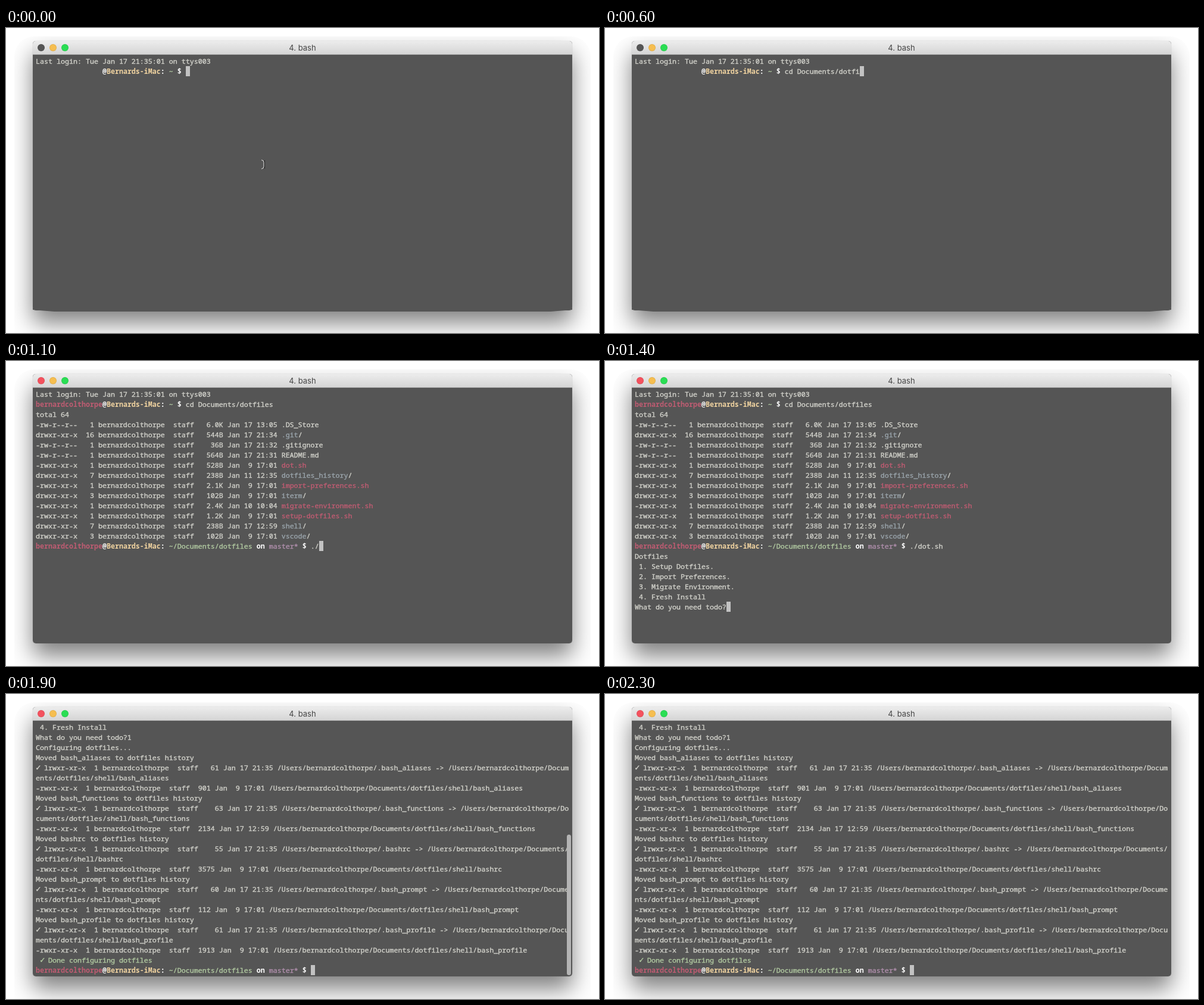
These frames come from a looping animation (996x512 px, 4300 ms). An HTML page:

```html
<!DOCTYPE html>
<html lang="en">
<head>
<meta charset="utf-8">
<title>Terminal</title>
<style>
html, body { margin: 0; width: 100%; height: 100%; overflow: hidden; background: #fff; }
#stage { position: relative; width: 100%; height: 100%; overflow: hidden; contain: paint; }
#stage > * { position: absolute; }
#halo { left: 14px; top: 14px; right: 14px; bottom: 0; border-radius: 34px 34px 0 0; overflow: hidden; }
#halo div { position: absolute; left: 31px; top: 8px; width: 906px; height: 452px; border-radius: 5px;
  box-shadow: 0 21px 38px rgba(0, 0, 0, .5), 0 0 1px rgba(0, 0, 0, .4); }
#lip { left: 45px; top: 470px; width: 906px; height: 6px; background: #555;
  clip-path: polygon(0 0, 100% 0, 100% 50%, 96% 100%, 4% 100%, 0 50%); }
#win { left: 45px; top: 22px; width: 906px; height: 452px; border-radius: 5px; overflow: hidden; background: #555; }
#bar { height: 23px; border-bottom: 1px solid #aaa; box-sizing: border-box; text-align: center;
  background: linear-gradient(#ececec, #d5d5d5); color: #454545; font: 13px/23px Inter, sans-serif; }
#bar i { position: absolute; top: 5px; width: 12px; height: 12px; border-radius: 50%;
  box-shadow: inset 0 0 0 1px rgba(0, 0, 0, .08); }
#text { position: absolute; left: 5px; top: 25px; color: #d0d0c9; white-space: pre;
  font: 11.667px/17px "Noto Sans Mono", "DejaVu Sans Mono", monospace; font-variant-ligatures: none;
  -webkit-text-stroke: .4px; }
#text div { height: 17px; }
#text .check { display: inline-block; width: 7px; height: 17px; vertical-align: top;
  font-family: "DejaVu Sans Mono", monospace; font-size: 14px; }
#text .cursor { display: inline-block; width: 7px; height: 17px; vertical-align: top; background: #c2c2c2; }
#scroll { position: absolute; left: 897px; top: 214px; width: 7px; height: 236px; border-radius: 4px; background: #b4b4b4; }
b { color: #fff; -webkit-text-stroke: 0; }
.red { color: #bf5c72; }
.yellow { color: #f0d3a0; }
.green { color: #b0c8a0; }
.purple { color: #b08fac; }
.blue { color: #99a3aa; }
.early .user { visibility: hidden; }
</style>
</head>
<body>
<div id="stage">
  <div id="halo"><div></div></div>
  <div id="lip"></div>
  <div id="win">
    <div id="bar">
      <i id="close" style="left:8px"></i><i style="left:28px;background:#f6be50"></i><i style="left:48px;background:#2ade54"></i>4. bash
    </div>
    <div id="text"></div>
    <div id="scroll"></div>
  </div>
  <svg id="mouse" style="left:426px;top:219px" width="14" height="20" fill="none">
    <path d="M8.5 3v14" stroke="#222"/>
    <path d="M3 2.500q4 .5 4 4v7q0 3.500-4 4" stroke="#ddd"/>
  </svg>
</div>
<script>
const LOOP = 4300, ROWS = 25, COLS = 128;
const USER = 'bernardcolthorpe', HOST = 'Bernards-iMac';
const HOME = `/Users/${USER}/`;

const $ = id => document.getElementById(id);
const span = (cls, text) => `<span class="${cls}">${text}</span>`;
const bold = (text, cls = '') => `<b class="${cls}">${text}</b>`;
const latest = (t, steps) => (steps.filter(s => s[0] <= t).pop() || [0, ''])[1];

const prompt = (path, branch = '') =>
  bold(USER, 'red user') + bold('@') + bold(HOST, 'yellow') + bold(': ') + span('green', path) +
  (branch && bold(' on ') + span('purple', branch)) + bold(' $ ');

const cdKeys = [[200, 'c'], [300, 'cd'], [400, 'cd Doc'], [500, 'cd Documents/'],
  [600, 'cd Documents/dotfi'], [700, 'cd Documents/dotfiles']];
const runKeys = [[900, '.'], [1000, './'], [1300, './dot.'], [1400, './dot.sh']];

// kind (f file, d directory, x script), links, size, date, name
const listing = [
  'f|1|6.0K|17 13:05|.DS_Store', 'd|16|544B|17 21:34|.git', 'f|1|36B|17 21:32|.gitignore',
  'f|1|564B|17 21:31|README.md', 'x|1|528B| 9 17:01|dot.sh', 'd|7|238B|11 12:35|dotfiles_history',
  'x|1|2.1K| 9 17:01|import-preferences.sh', 'd|3|102B| 9 17:01|iterm',
  'x|1|2.4K|10 10:04|migrate-environment.sh', 'x|1|1.2K| 9 17:01|setup-dotfiles.sh',
  'd|7|238B|17 12:59|shell', 'd|3|102B| 9 17:01|vscode'
].map(entry => {
  const [kind, links, size, date, name] = entry.split('|');
  const mode = { f: '-rw-r--r--', d: 'drwxr-xr-x', x: '-rwxr-xr-x' }[kind];
  const label = { f: name, d: span('blue', name) + '/', x: span('red', name) }[kind];
  return `${mode}${links.padStart(4)} ${USER}  staff   ${size.padStart(4)} Jan ${date} ${label}`;
});

const menu = ['Dotfiles', ' 1. Setup Dotfiles.', ' 2. Import Preferences.',
  ' 3. Migrate Environment.', ' 4. Fresh Install'];

const check = span('check', '✓');
const moved = [
  ['bash_aliases', '61', '901', ' 9 17:01'], ['bash_functions', '63', '2134', '17 12:59'],
  ['bashrc', '55', '3575', ' 9 17:01'], ['bash_prompt', '60', '112', ' 9 17:01'],
  ['bash_profile', '61', '1913', ' 9 17:01']
].flatMap(([name, linkSize, size, date]) => {
  const file = `${HOME}Documents/dotfiles/shell/${name}`;
  const link = `✓ lrwxr-xr-x  1 ${USER}  staff  ${linkSize.padStart(size.length)} Jan 17 21:35 ${HOME}.${name} -> ${file}`;
  return [`Moved ${name} to dotfiles history`,
    link.slice(0, COLS).replace('✓', check), link.slice(COLS),
    `-rwxr-xr-x  1 ${USER}  staff  ${size} Jan ${date} ${file}`];
});

function screen(t) {
  const repo = prompt('~/Documents/dotfiles', 'master*');
  const rows = ['Last login: Tue Jan 17 21:35:01 on ttys003', prompt('~') + latest(t, cdKeys)];
  if (t >= 700) rows.push('total 64', ...listing, repo + latest(t, runKeys));
  if (t >= 1400) rows.push(...menu, 'What do you need todo?' + (t >= 1600 ? '1' : ''));
  if (t >= 1700) rows.push('Configuring dotfiles...');
  if (t >= 1900) rows.push(...moved, span('green', ` ${check} Done configuring dotfiles`), repo);
  else if (t >= 1700) rows.push('');
  rows[rows.length - 1] += span('cursor', '');
  return rows.slice(-ROWS).map(row => `<div>${row}</div>`).join('');
}

let shown = '';
function draw(now) {
  const t = now % LOOP, early = t < 700;
  const html = screen(t);
  if (html !== shown) $('text').innerHTML = shown = html;
  document.body.className = early ? 'early' : '';
  $('lip').hidden = !early;
  $('close').style.background = early ? '#555' : '#f4525e';
  $('mouse').style.opacity = t < 200 ? 1 : 0;
  $('scroll').style.opacity = t < 1900 ? 0 : Math.max(0, 1 - Math.floor((t - 1900) / 100) / 4);
}

const start = performance.now();
(function tick() {
  draw(performance.now() - start);
  requestAnimationFrame(tick);
})();
</script>
</body>
</html>
```
